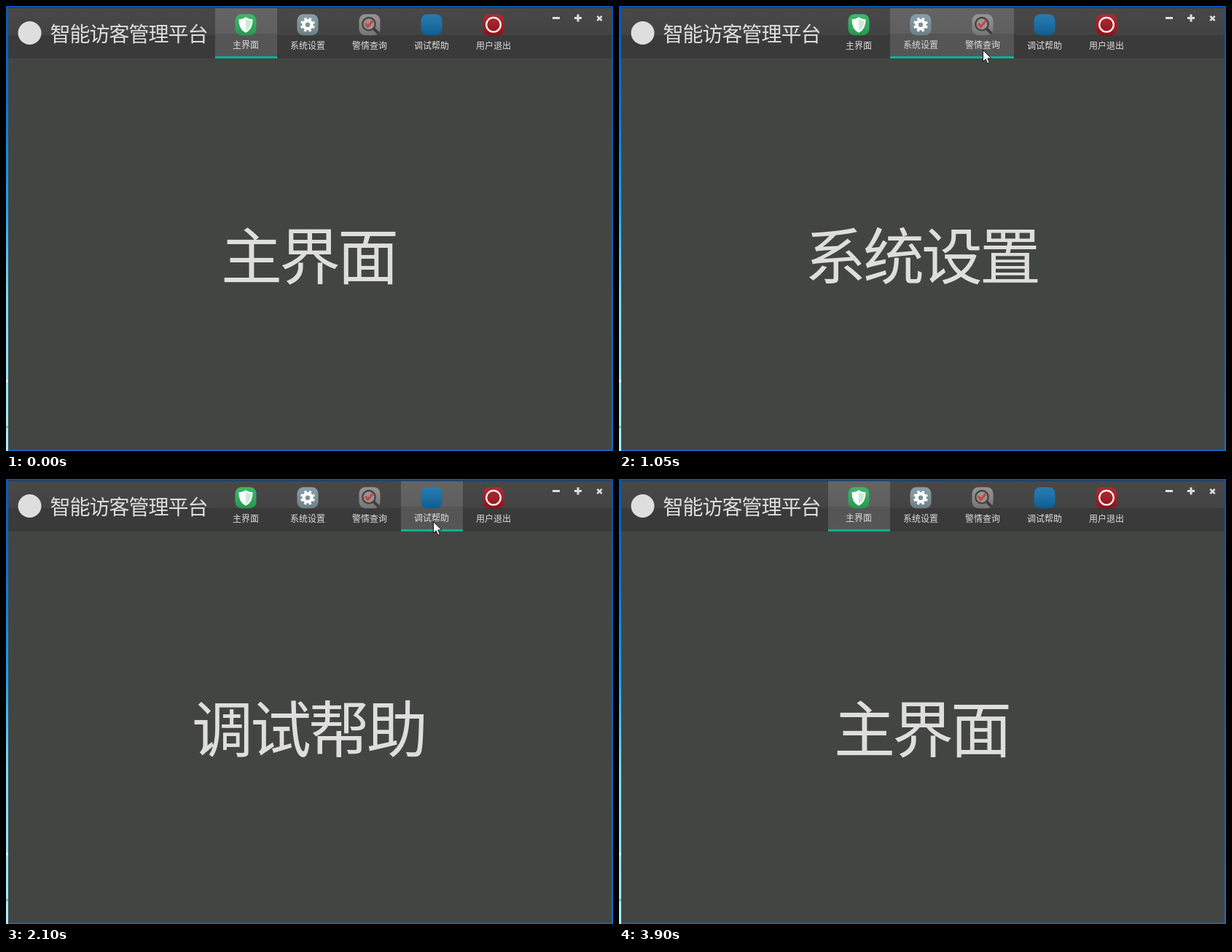
Recreate the animation shown at these times as an HTML page. Size 833x611 px, loop 4350 ms.

```html
<!DOCTYPE html>
<html lang="zh-CN">
<head>
<meta charset="utf-8">
<title>智能访客管理平台</title>
<style>
html, body { margin: 0; width: 100%; height: 100%; overflow: hidden; background: #434542; }
svg { display: block; width: 833px; height: 611px; }
text { font-family: "Noto Sans CJK SC", "Noto Sans CJK", sans-serif; fill: #dedede; }
.brand { font-size: 28px; letter-spacing: -1px; }
.page { font-size: 84px; letter-spacing: -4px; text-anchor: middle; }
.label { font-size: 12px; text-anchor: middle; }
.glow { visibility: hidden; }
.on .glow { visibility: visible; }
.on .label { transform: translateY(-1px); }
</style>
</head>
<body>
<svg viewBox="0 0 833 611">
  <defs>
    <linearGradient id="desk" x2="0" y2="1">
      <stop offset="0" stop-color="#0758b8"/>
      <stop offset=".2" stop-color="#0a70d8"/>
      <stop offset=".45" stop-color="#1ca4f6"/>
      <stop offset=".65" stop-color="#7adcfa"/>
      <stop offset="1" stop-color="#aaf0f8"/>
    </linearGradient>
    <linearGradient id="edge" x2="0" y2="1">
      <stop offset="0" stop-color="#0755b4"/>
      <stop offset="1" stop-color="#0f70ca"/>
    </linearGradient>
    <linearGradient id="bar" x2="0" y2="1">
      <stop offset="0" stop-color="#484848"/>
      <stop offset=".53" stop-color="#434343"/>
      <stop offset=".53" stop-color="#3a3a3a"/>
      <stop offset="1" stop-color="#3a3a3a"/>
    </linearGradient>
    <linearGradient id="lit" x2="0" y2="1">
      <stop offset="0" stop-color="#646464"/>
      <stop offset=".53" stop-color="#5f5f5f"/>
      <stop offset=".53" stop-color="#555"/>
      <stop offset="1" stop-color="#565656"/>
    </linearGradient>
    <linearGradient id="shade" x2="0" y2="1">
      <stop offset="0" stop-color="#fff" stop-opacity=".1"/>
      <stop offset="1" stop-color="#000" stop-opacity=".14"/>
    </linearGradient>
  </defs>

  <rect width="833" height="611" fill="url(#edge)"/>
  <rect width="3" height="611" fill="url(#desk)"/>
  <path d="M0 515h3" stroke="#e4fbf4" stroke-width="3"/>
  <path d="M0 578h3" stroke="#6cc59a" stroke-width="3"/>
  <rect x="3" y="2" width="828" height="607.5" fill="#434542"/>
  <rect x="3" y="3" width="828" height="69" fill="url(#bar)"/>
  <path d="M3 2.5H831" stroke="#303438"/>

  <circle cx="32.5" cy="37" r="16" fill="#dedede"/>
  <text class="brand" x="60.5" y="49">智能访客管理平台</text>

  <g stroke="#dedede" stroke-width="3">
    <path d="M750 16.5h10M780 16.5h10M785 11.5v10"/>
    <path d="M811.3 13.8l6.4 6.4M817.7 13.8l-6.4 6.4" stroke-width="2.6"/>
  </g>

  <g id="menu"></g>
  <text class="page" id="page" x="415" y="375"></text>
  <path id="pointer" d="M.5.5V16.5L4.2 13 6.8 18.9 9.3 17.8 6.8 12H11.8Z" fill="#fff" stroke="#111"/>
</svg>
<script>
const LOOP = 4350, TICK = 150, TAB_X = 287, TAB_W = 85;
const $ = id => document.getElementById(id);

// Icon art is centred on 0,0
const items = [
  ['主界面', '#2bae5b', `<path d="M0-10.5Q4-7.5 9.5-7.5Q10 6 0 11Q-10 6-9.5-7.5Q-4-7.5 0-10.5Z" fill="#fff"/>
    <path d="M0-8Q3.5-5.6 7.5-5.4Q7.5 4.5 0 8.6Z" fill="#c9ecd5"/>`],
  ['系统设置', '#7c939b', `<circle r="8" fill="none" stroke="#fff" stroke-width="4" stroke-dasharray="3.14"
    transform="rotate(11)"/><circle r="5.4" fill="none" stroke="#fff" stroke-width="4.4"/>`],
  ['警情查询', '#8b8787', `<path d="M5 5L11 11" stroke="#3d3d3d" stroke-width="4" stroke-linecap="round"/>
    <circle cx="-1" cy="-1" r="8.7" fill="#989494" stroke="#444" stroke-width="2.4"/>
    <path d="M-6-2L-2.5 2.5L5-6" fill="none" stroke="#c94343" stroke-width="3.2"/>`],
  ['调试帮助', '#0f6ca8', ''],
  ['用户退出', '#a5131d', '<circle r="9.8" fill="none" stroke="#fff" stroke-width="2.2"/>']
];

$('menu').innerHTML = items.map(([name, color, art], i) => `
  <g transform="translate(${TAB_X + TAB_W * i} 0)">
    <g class="glow">
      <rect y="3" width="85" height="66" fill="url(#lit)"/>
      <rect y="69" width="85" height="3" fill="#0db195"/>
    </g>
    <g transform="translate(42 25.7)">
      <rect x="-14.5" y="-14.5" width="29" height="29" rx="8.5" fill="${color}"/>
      <rect x="-14.5" y="-14.5" width="29" height="29" rx="8.5" fill="url(#shade)"/>
      ${art}
    </g>
    <text class="label" x="42" y="58.5">${name}</text>
  </g>`).join('');
const tabs = [...$('menu').children];

// Pointer key points: time, x, y
const path = [
  [150, 560, 230],
  [450, 413, 57], [750, 413, 57],
  [1050, 499, 60], [1350, 499, 60],
  [1500, 551, 65],
  [1800, 586, 58], [2250, 586, 58],
  [2550, 348, 41],
  [3000, 336, 57],
  [3150, 787, 48],
  [3900, 816, 12]
];
const clicks = [600, 1350, 1950, 2700];

function pointerAt(t) {
  const i = path.findIndex(p => p[0] > t);
  if (i < 1) return null;
  const [t0, x0, y0] = path[i - 1], [t1, x1, y1] = path[i];
  const k = (t - t0) / (t1 - t0);
  return [x0 + (x1 - x0) * k, y0 + (y1 - y0) * k].map(Math.round);
}

function tabAt(t) {
  const p = pointerAt(t);
  return p && p[1] < 65 ? Math.floor((p[0] - TAB_X) / TAB_W) : -1;
}

function draw() {
  // The screen refreshes once per tick; a click shows on the next one
  const t = Math.floor(performance.now() % LOOP / TICK) * TICK;
  const click = clicks.findLast(c => c < t);
  const checked = click ? tabAt(click) : 0;
  const hover = tabAt(t), at = pointerAt(t);

  tabs.forEach((tab, i) => tab.classList.toggle('on', i === checked || i === hover));
  $('page').textContent = items[checked][0];
  $('pointer').setAttribute('visibility', at ? 'visible' : 'hidden');
  if (at) $('pointer').setAttribute('transform', `translate(${at})`);
  requestAnimationFrame(draw);
}
draw();
</script>
</body>
</html>
```
